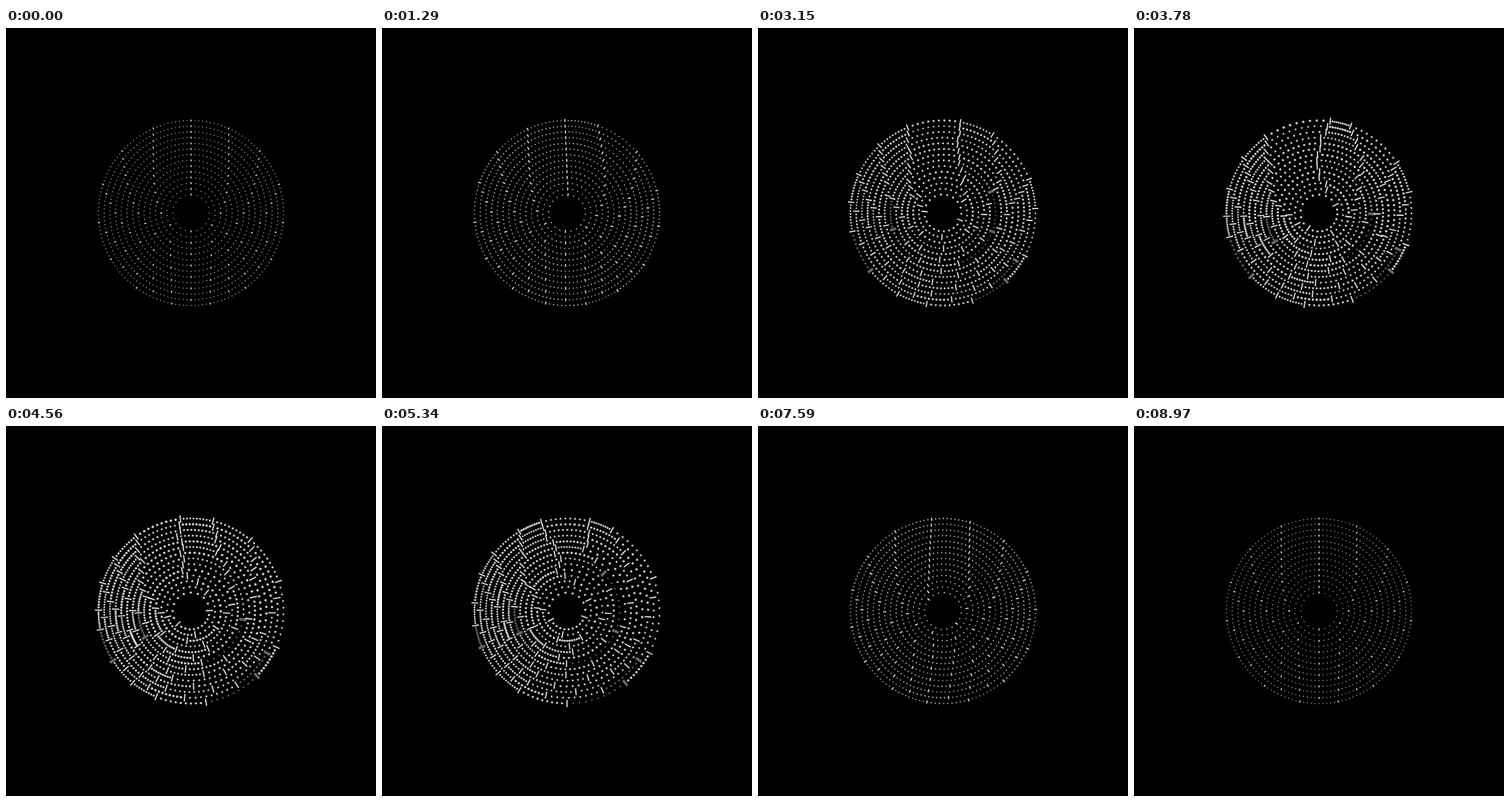
An HTML page with a canvas for the animation above (9000 ms loop, 500 px wide and 500 px high).

```html
<!DOCTYPE html>
<html lang="en">
<head>
<meta charset="utf-8">
<title>Dotted rings</title>
<style>
html, body { margin: 0; width: 100%; height: 100%; overflow: hidden; background: #000; }
canvas { display: block; width: 500px; height: 500px; }
</style>
</head>
<body>
<canvas id="stage" width="500" height="500"></canvas>
<script>
const ctx = document.getElementById("stage").getContext("2d");
const LOOP = 9000, STEP = 30, TAU = Math.PI * 2;
const OUTER = 125, GAP = 7.7, MOST = 15, DOTS = 10;
const DEG = Math.PI / 180;

// Rotation in degrees around the outer ring at a few moments of the loop.
const still = Array(MOST).fill(0);
const poses = [
  [0, still],
  [2460, [-8, -11, -3, 5, 1, 6, 3, -1, 2, -2, -1, -1, -1, -6, -7]],
  [3780, [-35, -17, -28, -15, -19, -10, -15, -9, -3, -9, -13, -9, -20, -27, -30]],
  [5340, [-31, -40, -34, -43, -27, -3, -3, 12, 19, 12, 7, -3, -13, -19, -28]],
  [6450, [-11, -15, -13, -16, -21, -11, -15, -13, -15, -18, -13, -16, -18, -19, -17]],
  [7590, [-7, -7, -7, -7, -7, -6, -5, -4, -2, -3, -3, -4, -5, -6, -7]],
  [LOOP, still]
];

const mix = (a, b, u) => a + (b - a) * u;

function hash(a, b) {
  const v = Math.sin(a * 127.1 + b * 311.7) * 43758.5453;
  return v - Math.floor(v);
}

function slope(p, i) {
  if (p === 0 || p === poses.length - 1) return 0;
  const [t0, a] = poses[p - 1], [t1, b] = poses[p + 1];
  return (b[i] - a[i]) / (t1 - t0);
}

// Smooth curve through the poses.
function field(t) {
  let p = 0;
  while (p < poses.length - 2 && t >= poses[p + 1][0]) p++;
  const [t0, a] = poses[p], [t1, b] = poses[p + 1];
  const span = t1 - t0, u = (t - t0) / span, v = 1 - u;
  return a.map((from, i) =>
    from * (1 + 2 * u) * v * v + b[i] * u * u * (3 - 2 * u) +
    span * (slope(p, i) * u * v * v - slope(p + 1, i) * u * u * v));
}

function sample(values, turn) {
  const x = turn * MOST, i = Math.floor(x);
  return mix(values[i % MOST], values[(i + 1) % MOST], x - i);
}

function tickAngles(n, r, values, mean, t, swell) {
  const k = r / OUTER, angles = [];
  for (let j = 0; j < n; j++) {
    const turn = j / n;
    const swing = mean * (2 - k) + (sample(values, turn) - mean) * k;
    const drift = 18 * (1 - k) * swell * swell *
      Math.sin(TAU * (t / LOOP + hash(n, j)));
    angles.push(turn * TAU + (swing * DEG * OUTER + drift) / r);
  }
  // Keep neighbouring ticks in order.
  const least = 18 / r;
  for (let j = 1; j < n; j++) angles[j] = Math.max(angles[j], angles[j - 1] + least);
  const spill = Math.max(0, angles[n - 1] + least - angles[0] - TAU);
  return angles.map((a, j) => a - spill * j / n);
}

function dot(r, a, size) {
  ctx.beginPath();
  ctx.arc(250 + r * Math.sin(a), 250 - r * Math.cos(a), size, 0, TAU);
  ctx.fill();
}

function tick(r, a, length, width) {
  const s = Math.sin(a), c = Math.cos(a), h = length / 2;
  ctx.lineWidth = width;
  ctx.beginPath();
  ctx.moveTo(250 + (r - h) * s, 250 - (r - h) * c);
  ctx.lineTo(250 + (r + h) * s, 250 - (r + h) * c);
  ctx.stroke();
}

function ring(n, values, mean, t, swell) {
  const r = OUTER - (MOST - n) * GAP;
  const angles = tickAngles(n, r, values, mean, t, swell);
  angles.forEach((a, j) => {
    const b = j + 1 < n ? angles[j + 1] : angles[0] + TAU;
    const low = Math.cos((a + b) / 2) < 0.3;
    const dim = low && n > 5 && hash(n + 40, j) < 0.16 ? Math.min(1, swell * 1.4) : 0;
    const vary = mix(0.6, 1.1, hash(n + 9, j));
    const size = 0.68 + 0.95 * swell * vary;
    ctx.fillStyle = `rgba(238,240,234,${0.86 - 0.5 * dim})`;
    for (let d = 1; d < DOTS; d++) dot(r, mix(a, b, d / DOTS), size);
    ctx.strokeStyle = `rgba(245,246,240,${0.92 - 0.5 * dim})`;
    tick(r, a, 2.7 + 7.2 * swell, 1.4 + 0.25 * swell + 2 * dim);
  });
}

function draw(t) {
  const swell = Math.sin(Math.PI * t / LOOP) ** 2;
  const values = field(t);
  const mean = values.reduce((sum, v) => sum + v, 0) / MOST;
  ctx.fillStyle = "#000";
  ctx.fillRect(0, 0, 500, 500);
  for (let n = 2; n <= MOST; n++) ring(n, values, mean, t, swell);
}

const start = performance.now();
function frame() {
  const t = (performance.now() - start) % LOOP;
  draw(Math.floor(t / STEP) * STEP);
  requestAnimationFrame(frame);
}
frame();
</script>
</body>
</html>
```
